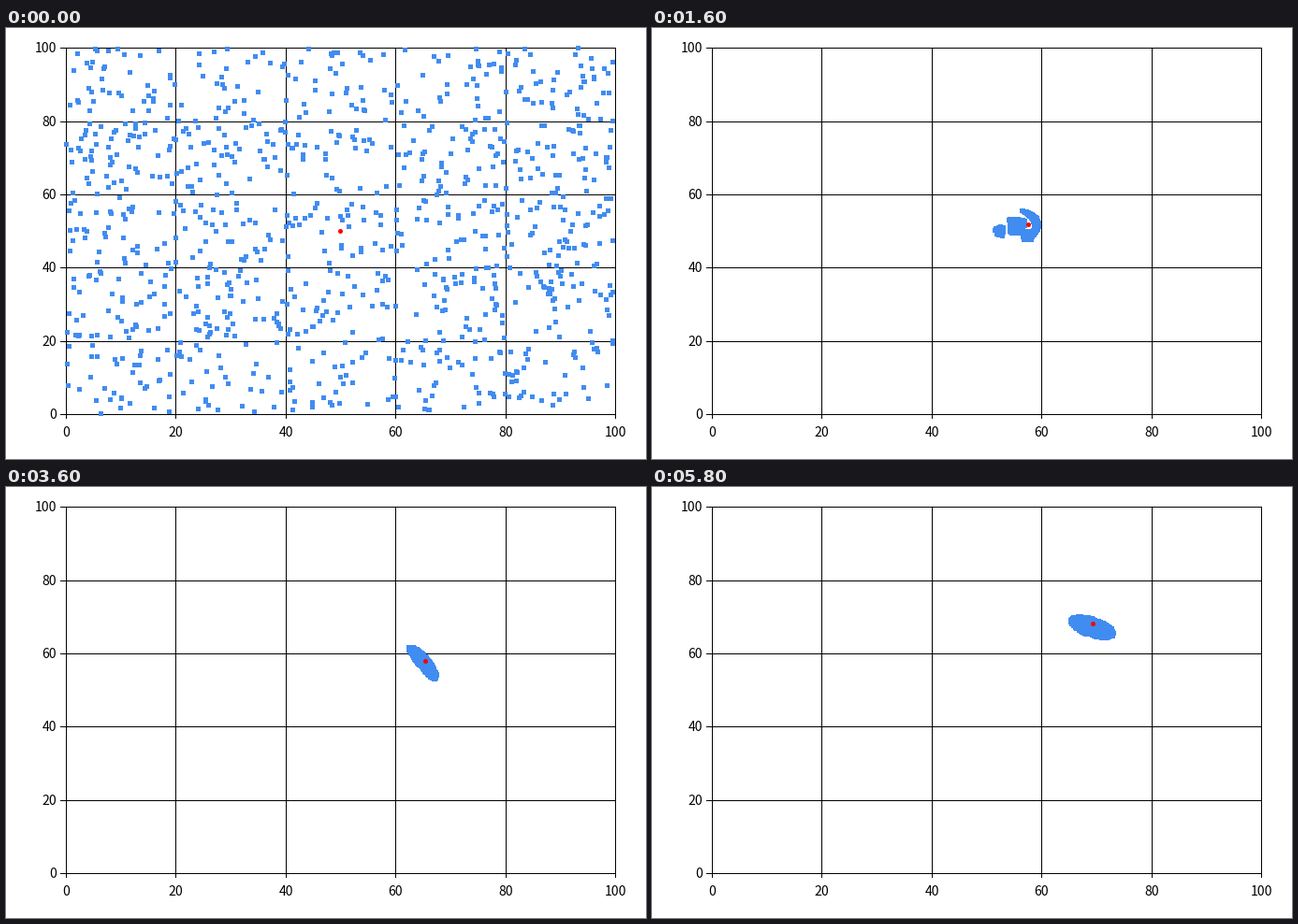
A matplotlib script that plays this animation: 684x461 px, repeating every 6 s.

```python
import numpy as np
import matplotlib.pyplot as plt
from matplotlib.animation import FuncAnimation
from matplotlib.collections import PolyCollection
from matplotlib.patches import Circle

W, H, DPI = 684, 461, 100
PX = 72 / DPI  # points per pixel
FRAMES, INTERVAL = 30, 200
COUNT, CLUSTERS = 1000, 16
TURN = 0.05  # radians per step
SQUARE = np.array([(-2, -2), (3, -2), (3, 3), (-2, 3)])

rng = np.random.default_rng(12)


def to_px(x, y):
    """Chart units (0-100) to stage pixels."""
    return np.stack([64 + 5.87 * np.asarray(x), 413 - 3.916 * np.asarray(y)], -1)


# The tracked point turns a little, then moves one unit, at every step.
heading = TURN * np.arange(1, FRAMES)
track = to_px(50 + np.r_[0, np.cos(heading).cumsum()],
              50 + np.r_[0, np.sin(heading).cumsum()])

# Uniform start, then a few surviving clusters that die out one by one.
start = to_px(*rng.uniform(0, 100, (2, COUNT)))
centre = rng.uniform((-55, -12), (20, 18), (CLUSTERS, 2))
death = rng.uniform(4.5, 12, CLUSTERS)
member = (CLUSTERS * rng.random(COUNT) ** 2).astype(int)
scatter = rng.uniform(-1, 1, (COUNT, 2))

# Unit disc that is stretched into the final swarm.
radius, angle = np.sqrt(rng.random(COUNT)), rng.uniform(0, 2 * np.pi, COUNT)
u, v = radius * np.cos(angle), radius * np.sin(angle)


def swarm(n):
    """Crescent across the heading that straightens and thickens."""
    lead = 60 * np.exp(-n / 5)
    across = 25 * (1 - np.exp(-n / 8)) * u
    along = 0.31 * n * v - 4 + lead * (1 - u ** 2)
    a = TURN * n - 0.2
    return np.stack([along * np.cos(a) + across * np.sin(a),
                     across * np.cos(a) - along * np.sin(a)], -1)


def particles(n):
    if n == 0:
        return start
    clusters = (1.32 - 0.08 * n) * centre[member] + 0.6 * n * scatter
    alive = (n < death[member])[:, None]
    return track[n] + np.where(alive, clusters, swarm(n))


fig = plt.figure(figsize=(W / DPI, H / DPI), dpi=DPI, facecolor="white")
ax = fig.add_axes([0, 0, 1, 1])
ax.set(xlim=(0, W), ylim=(H, 0))
ax.axis("off")


def line(x, y):
    ax.plot(x, y, color="black", lw=PX, snap=False,
            solid_capstyle="butt", zorder=1)


def label(x, y, value, ha):
    ax.text(x, y, str(value), ha=ha, va="baseline", color="black",
            family="Noto Sans CJK JP", size=14 * PX)


for value in range(0, 101, 20):
    gx, gy = np.round(to_px(value, value)) + .5
    line([gx, gx], [21, 418])
    line([58, 652], [gy, gy])
    label(gx, 437, value, "center")
    label(54, gy + 4.5, value, "right")

dots = PolyCollection([], facecolor="#418CF0", linewidth=0, zorder=2)
ax.add_collection(dots, autolim=False)
target = ax.add_patch(Circle((0, 0), 2.5, facecolor="red", linewidth=0, zorder=3))


def draw(n):
    dots.set_verts(np.floor(particles(n))[:, None] + SQUARE)
    target.center = np.floor(track[n]) + .5
    return dots, target


anim = FuncAnimation(fig, draw, frames=FRAMES, interval=INTERVAL,
                     repeat=True, repeat_delay=0)
plt.show()
```
